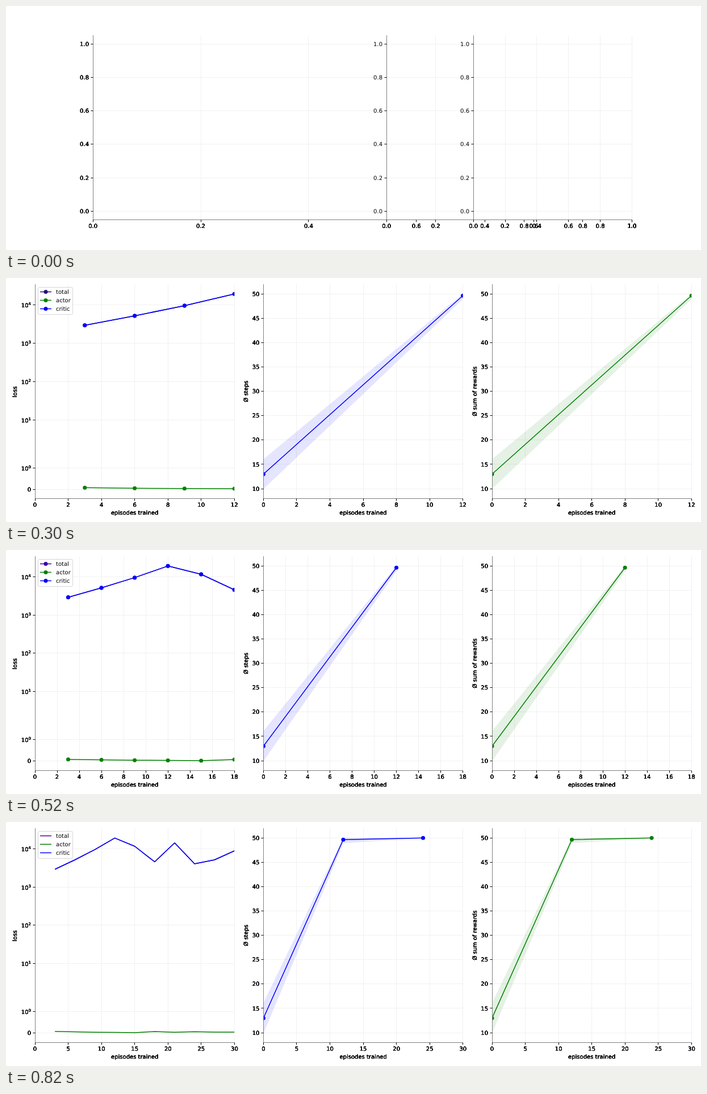
An HTML page that plays this animation: 1224 px wide and 432 px high, repeating every 0.9 s.

```html
<!DOCTYPE html>
<html lang="en">
<head>
<meta charset="utf-8">
<title>Training curves</title>
<style>
  html, body { margin: 0; width: 100%; height: 100%; overflow: hidden; background: #fff; }
  svg { display: block; width: 1224px; height: 432px; }
  text { font: 10px "DejaVu Sans", sans-serif; text-rendering: geometricPrecision; white-space: pre; }
</style>
</head>
<body>
<svg id="stage" viewBox="0 0 1224 432"></svg>
<script>
const stage = document.getElementById("stage");
const LOOP = 900;
const BLUE = "#0000ff", GREEN = "#008000";

// Losses are logged every 3 episodes, evaluation runs every 12.
const critic = [2890, 5100, 9415, 18900, 11490, 4520, 14090, 4015, 5090, 8770];
const actor = [.08, .055, .04, .033, .016, .07, .04, .062, .042, .042];
const evals = [
  { mean: 13, low: 10, high: 16 },
  { mean: 49.67, low: 49, high: 50 },
  { mean: 50, low: 50, high: 50 }
];

const steps = [
  { at: 0 },
  { at: 100, max: 6, tick: 1, width: 354.5, evals: 1, total: "#4b0082" },
  { at: 300, max: 12, tick: 2, width: 351.2, evals: 2, total: "#221080" },
  { at: 400, max: 18, tick: 2, width: 351.2, evals: 2, total: "#3c00a8" },
  { at: 600, max: 24, tick: 5, width: 357.4, evals: 3, total: "#2200c8" },
  { at: 700, max: 30, tick: 5, width: 351.4, evals: 3, total: "#4b0090", plain: true }
];

const snap = v => Math.floor(v) + .5;
const range = (a, b, d) => Array.from({ length: Math.floor((b - a) / d + 1.001) }, (_, i) => a + i * d);

const line = (x1, y1, x2, y2, color, w = 1) =>
  `<path d="M${x1} ${y1}L${x2} ${y2}" stroke="${color}" stroke-width="${w}"/>`;

// Labels are stacked several times, which hardens their edges.
const label = (x, y, s, anchor = "middle", copies = 4, extra = "") =>
  `<text x="${x}" y="${y}" text-anchor="${anchor}" ${extra}>${s}</text>`.repeat(copies);

const sideLabel = (x, y, s) => label(x, y, s, "middle", 4, `transform="rotate(-90 ${x} ${y})"`);

const dot = (x, y, color) => `<circle cx="${x}" cy="${y}" r="3.5" fill="${color}"/>`;

const curve = (pts, color, dots) =>
  `<polyline points="${pts.join(" ")}" fill="none" stroke="${color}" stroke-width="1.5" stroke-linejoin="round"/>` +
  (dots ? pts.map(p => dot(p[0], p[1], color)).join("") : "");

const power = n => `10<tspan dy="-4" font-size="7">${n}</tspan>`;

// box: {l, r, t, b}; xs and ys: lists of {p: position, s: text, drop: extra baseline}
function axes(box, xs, ys, body = "", yCopies = 4) {
  const { l, r, t, b } = box, id = "c" + Math.round(l);
  const X = snap(l), Y = snap(b);
  let out = `<rect x="${l}" y="${t}" width="${r - l}" height="${b - t}" fill="#fff"/>`;
  for (const { p } of xs) out += line(snap(p), t, snap(p), b, "#f1f1f1");
  for (const { p } of ys) out += line(l, snap(p), r, snap(p), "#f1f1f1");
  out += `<clipPath id="${id}"><rect x="${l}" y="${t}" width="${r - l}" height="${b - t}"/></clipPath>`;
  out += `<g clip-path="url(#${id})">${body}</g>`;
  out += line(X, t, X, Y + .5, "#808080") + line(X - .5, Y, r, Y, "#808080");
  for (const { p, s } of xs)
    out += line(snap(p), Y, snap(p), Y + 4, "#000") + label(p, Math.round(b + 14.6), s);
  for (const { p, s, drop = 0 } of ys)
    out += line(X - 4, snap(p), X, snap(p), "#000") +
      label(l - 7, Math.round(p + 3.6 + drop), s, "end", yCopies);
  return out;
}

function emptyAxes() {
  const unit = range(0, 1, .2);
  return [153, 670, 823].map((l, i) => {
    const box = { l, r: 1102.5, t: 52, b: 378.2 };
    return axes(box,
      unit.map(v => ({ p: l + .2 + v * (1102.2 - l), s: v.toFixed(1) })),
      unit.map(v => ({ p: 363.4 - v * 296.4, s: v.toFixed(1) })),
      "", i ? 1 : 4);
  }).join("");
}

const TOP = 11.1, BOTTOM = 390.3, PAD = 17.25;

// Fits a value range into the panel height with a 5% margin.
const fitY = (lo, hi) => v =>
  BOTTOM - PAD - (v - lo) / (hi - lo) * (BOTTOM - TOP - 2 * PAD);

// Symmetric log: linear up to 2, then one unit per decade.
const symlog = v => v < 2 ? v / 1.8 : 1 / .9 + Math.log10(v / 2);

function panel(l, step, ys, makeBody) {
  const x = v => l + v / step.max * step.width;
  const xs = range(0, step.max, step.tick).map(v => ({ p: x(v), s: v }));
  return axes({ l, r: l + step.width, t: TOP, b: BOTTOM }, xs, ys, makeBody(x)) +
    label(l + step.width / 2, 419, "episodes trained");
}

function legend(step) {
  const rows = [["total", step.total], ["actor", GREEN], ["critic", BLUE]];
  return `<rect x="56.5" y="16.5" width="61" height="48" rx="2" fill="#fff" fill-opacity=".8" stroke="#ccc" stroke-opacity=".8"/>` +
    rows.map(([s, color], i) => {
      const y = 24.5 + 15 * i;
      return line(60, y, 80, y, color, 1.5) + (step.plain ? "" : dot(70, y, color)) +
        label(88, y + 3.5, s, "start", 1);
    }).join("");
}

function lossPanel(step) {
  const n = step.max / 3;
  const c = critic.slice(0, n), a = actor.slice(0, n);
  const fit = fitY(symlog(Math.min(...a)), symlog(Math.max(...c)));
  const y = v => fit(symlog(v));
  const ys = [{ p: y(0), s: "0" }];
  for (let e = 0; 10 ** e < Math.max(...c); e++) ys.push({ p: y(10 ** e), s: power(e), drop: .9 });
  return panel(51, step, ys, x => {
    const pts = data => data.map((v, i) => [x(3 * i + 3), y(v)]);
    return curve(pts(c), step.total, !step.plain) + curve(pts(a), GREEN, !step.plain) +
      curve(pts(c), BLUE, !step.plain);
  }) + legend(step) + sideLabel(19, 201.5, "loss");
}

function evalPanel(l, step, color, name) {
  const data = evals.slice(0, step.evals);
  const single = data.length === 1;
  const y = fitY(10, single ? 16 : 50);
  const ys = range(10, single ? 16 : 50, single ? 1 : 5).map(v => ({ p: y(v), s: v }));
  return panel(l, step, ys, x => {
    const pts = key => data.map((d, i) => [x(12 * i), y(d[key])]);
    const band = single ? "" :
      `<polygon points="${[...pts("high"), ...pts("low").reverse()].join(" ")}" fill="${color}" stroke="${color}" opacity=".1"/>`;
    return band + curve(pts("mean"), color, true);
  }) + sideLabel(Math.round(l - 27.2), 200.7, name);
}

function draw(step) {
  stage.innerHTML = step.max
    ? lossPanel(step) + evalPanel(453.4, step, BLUE, "Ø steps") +
      evalPanel(856, step, GREEN, "Ø sum of rewards")
    : emptyAxes();
}

let shown = null;
const start = performance.now();
function tick() {
  const t = (performance.now() - start) % LOOP;
  const step = steps.findLast(s => t >= s.at);
  if (step !== shown) draw(shown = step);
  requestAnimationFrame(tick);
}
tick();
</script>
</body>
</html>
```
